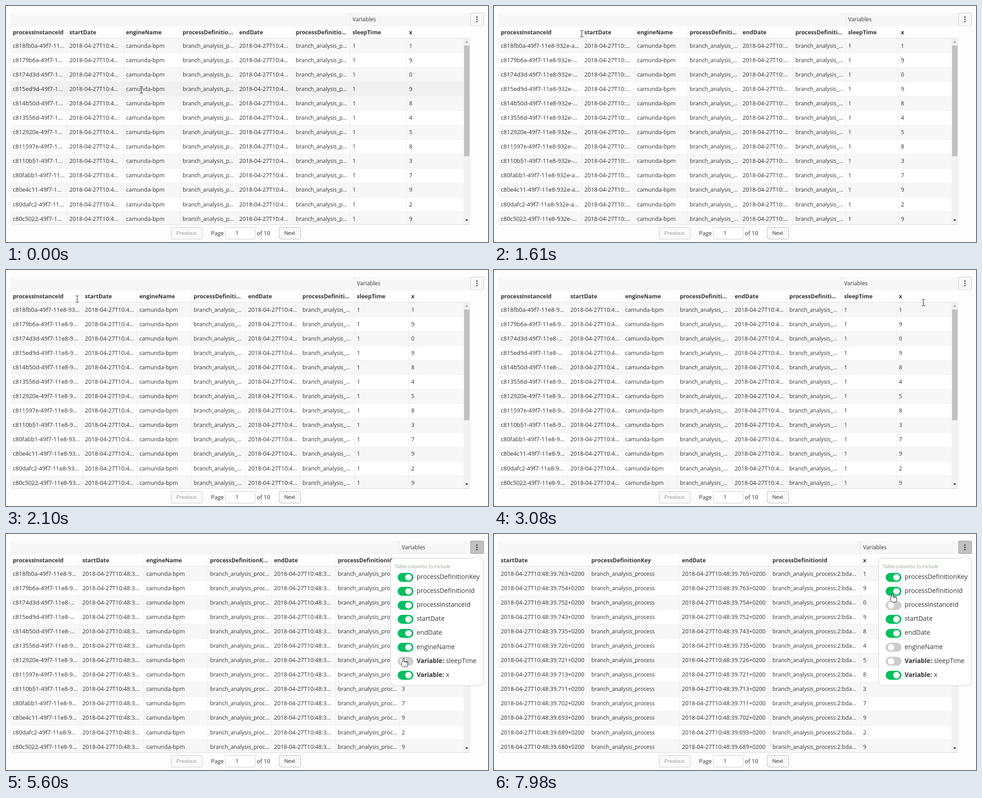
Write an HTML page with a canvas that moves like this. It is 1067x525 px and loops after 8000 ms.

```html
<!DOCTYPE html>
<html lang="en">
<head>
<meta charset="utf-8">
<title>Resizable table with column selection</title>
<style>
  html, body { margin: 0; width: 100%; height: 100%; overflow: hidden; background: #fdfdfd; }
  canvas { display: block; }
</style>
</head>
<body>
<canvas id="stage" width="1067" height="525"></canvas>
<script>
const ctx = document.getElementById('stage').getContext('2d');
const LOOP = 8000, STEP = 70;
const LEFT = 10, TABLE_WIDTH = 1002.5, ROW_TOP = 72, ROW_HEIGHT = 32.08, PADDING = 5;
const FAMILY = '"Open Sans", "Noto Sans", sans-serif';
const font = (size, weight = 400) => `${weight} ${size}px ${FAMILY}`;
const BODY = font(12.25), HEAD = font(12.45, 700), IDS = font(12.85), DIGITS = font(12.7);

// id, milliseconds of the start date, value of x
const rows = `c818fb0a 763 1, c8179b6a 754 9, c8174d3d 752 0, c815ed9d 743 9, c814b50d 735 8,
  c813556d 726 4, c812920e 721 5, c811597e 713 8, c8110b51 711 3, c80fabb1 702 7,
  c80e4c11 693 9, c80dafc2 689 2, c80c5022 680 9`.split(',').map(row => {
  const [id, start, x] = row.trim().split(' ');
  return { id, start, x };
});
// Each instance ends when the one listed above it starts.
rows.forEach((row, i) => row.end = i ? rows[i - 1].start : '765');
const date = millis => `2018-04-27T10:48:39.${millis}+0200`;

const columns = [
  { name: 'processInstanceId', font: IDS, cell: row => row.id + '-49f7-11e8-932e-abd4c0e1' },
  { name: 'startDate', font: DIGITS, cell: row => date(row.start) },
  { name: 'engineName', font: font(12.5), cell: () => 'camunda-bpm' },
  { name: 'processDefinitionKey', font: BODY, cell: () => 'branch_analysis_process' },
  { name: 'endDate', font: DIGITS, cell: row => date(row.end) },
  { name: 'processDefinitionId', font: BODY, cell: () => 'branch_analysis_process:2:bdab40d2' },
  { name: 'sleepTime', font: DIGITS, variable: true, cell: () => '1' },
  { name: 'x', font: DIGITS, variable: true, cell: row => row.x }
];
const menu = ['processDefinitionKey', 'processDefinitionId', 'processInstanceId',
  'startDate', 'endDate', 'engineName', 'sleepTime', 'x'];

// Moments at which switches are clicked; the table follows shortly after.
const clicks = { sleepTime: 5390, engineName: 6790, processInstanceId: 7490 };
const RELAYOUT_DELAY = 140, SWITCH_TIME = 210;
const DRAG_START = 1260, DRAG_END = 2240, FOCUS_AT = 3360, MENU_AT = 3570;

// [time, x, y] of the pointer's hot spot
const pointerPath = [
  [0, 300, 186], [840, 122, 61], [1190, 135.3, 61], [1260, 135.3, 61],
  [1540, 195, 61], [1880, 195, 61], [2100, 158, 64], [2170, 164, 62], [2310, 164, 62],
  [2800, 610, 166], [3150, 1036, 48], [3430, 1040, 20], [3710, 1040, 33],
  [4200, 914, 100], [4550, 867, 262], [4900, 867, 314], [5250, 880, 276], [5740, 880, 276],
  [6300, 890, 247], [6930, 890, 247], [7420, 884, 151], [7630, 884, 151], [7980, 882, 132]
];

function pointerAt(t) {
  const next = pointerPath.findIndex(point => point[0] > t);
  if (next < 0) return pointerPath.at(-1).slice(1);
  const [t0, x0, y0] = pointerPath[next - 1], [t1, x1, y1] = pointerPath[next];
  const k = (t - t0) / (t1 - t0);
  return [x0 + (x1 - x0) * k, y0 + (y1 - y0) * k];
}

function text(value, x, y, face = BODY, color = '#333') {
  ctx.font = face;
  ctx.fillStyle = color;
  ctx.fillText(value, x, y);
}

function fitted(value, x, y, width, face) {
  ctx.font = face;
  let shown = value, length = value.length;
  while (length && ctx.measureText(shown).width > width) shown = value.slice(0, --length) + '...';
  text(shown, x, y, face);
}

function rect(x, y, w, h, color) {
  ctx.fillStyle = color;
  ctx.fillRect(x, y, w, h);
}

function paint(fill, stroke) {
  ctx.fillStyle = fill;
  ctx.fill();
  if (!stroke) return;
  ctx.strokeStyle = stroke;
  ctx.stroke();
}

function box(x, y, w, h, radius, fill, stroke) {
  ctx.beginPath();
  ctx.roundRect(x, y, w, h, radius);
  paint(fill, stroke);
}

function circle(x, y, r, color) {
  ctx.beginPath();
  ctx.arc(x, y, r, 0, 2 * Math.PI);
  paint(color);
}

// Triangle pointing up (or down for a negative height)
function triangle(x, y, halfWidth, height, fill, stroke) {
  ctx.beginPath();
  ctx.moveTo(x - halfWidth, y + height);
  ctx.lineTo(x, y);
  ctx.lineTo(x + halfWidth, y + height);
  paint(fill, stroke);
}

function drawTable(t, [px, py]) {
  const visible = columns.filter(c => !(t >= clicks[c.name] + RELAYOUT_DELAY));
  const resized = t >= DRAG_START && visible[0] === columns[0];
  // The dragged edge trails the pointer by one step.
  const first = resized
    ? pointerAt(Math.min(t, DRAG_END) - STEP)[0] - LEFT
    : TABLE_WIDTH / visible.length;
  const rest = (TABLE_WIDTH - first) / (visible.length - 1);
  const hovered = py > ROW_TOP && px < 1013 && t < MENU_AT ? Math.floor((py - ROW_TOP) / ROW_HEIGHT) : -1;

  rect(LEFT, 15, 1018, 28, '#f7f7f7');
  rect(LEFT, 43, 1018, 443, '#fff');
  rect(LEFT, 43, 1018, 1, '#ececec');
  rows.forEach((_, i) => {
    const top = Math.round(ROW_TOP + i * ROW_HEIGHT), height = Math.min(33, 486 - top);
    rect(LEFT, top, 1003, height, i === hovered ? '#f0f0f0' : i % 2 ? '#fff' : '#f7f7f7');
    rect(LEFT, top, 1003, 1, '#f2f2f2');
  });
  rect(LEFT, 71, 1018, 1, '#e4e4e4');

  const firstVariable = visible.find(c => c.variable);
  visible.forEach((column, n) => {
    const left = n ? LEFT + first + (n - 1) * rest : LEFT;
    const x = left + PADDING, room = (n ? rest : first) - 2 * PADDING;
    if (n) rect(Math.round(left) - 1, 44, 1, 442, '#eee');
    if (column === firstVariable) {
      rect(Math.round(left) - 1, 15, 1, 28, '#e6e6e6');
      text('Variables', x, 34);
    }
    fitted(column.name, x, 63, room, HEAD);
    rows.forEach((row, i) =>
      fitted(column.cell(row), x, Math.round(92.7 + i * ROW_HEIGHT), room, column.font));
  });

  rect(1013, 72, 15, 414, '#f1f1f1');
  rect(1014, 88, 12, 246, '#c1c1c1');
  triangle(1020, 78, 3.5, 4, '#a3a3a3');
  triangle(1020, 479, 3.5, -4, '#404040');
  rect(LEFT, 486, 1018, 1, '#ddd');
}

function drawPager() {
  const buttonFont = '11.6px "Liberation Sans", Arial, sans-serif';
  box(365.5, 492.5, 69, 26, 2, '#f9f9f9', '#ccc');
  text('Previous', 377, 509, buttonFont, '#999');
  text('Page', 454, 510);
  box(485.5, 492.5, 66, 26, 2, '#fff', '#ccc');
  text('1', 508, 510, DIGITS);
  text('of 10', 555, 510, DIGITS);
  box(604.5, 492.5, 48, 26, 2, '#f8f8f8', '#bbb');
  text('Next', 616, 509, buttonFont);
}

function drawMenuButton(t) {
  const pressed = t >= FOCUS_AT;
  ctx.save();
  if (pressed && t < clicks.sleepTime) {
    ctx.shadowColor = '#2f94d6';
    ctx.shadowBlur = 5;
  }
  box(1028.5, 15.5, 29, 28, 1, pressed ? '#c0c0c0' : '#f9f9f9', pressed ? '#999' : '#ccc');
  ctx.restore();
  for (const y of [24.5, 29.5, 34.5]) circle(1042.5, y, 1.6, '#333');
}

function drawMenu(t) {
  box(851.5, 53.5, 206, 284, 9, '#fff', '#ccc');
  triangle(1043, 45, 9, 9, '#fff', '#ccc');
  text('Table columns to include', 861, 76, font(10.7), '#86a58a');

  menu.forEach((name, i) => {
    const y = 96.5 + i * 31.1, baseline = Math.round(100 + i * 31.1);
    const off = Math.min(1, Math.max(0, (t - (clicks[name] ?? LOOP)) / SWITCH_TIME));
    box(867, y - 10, 35, 20, 10, off > 0.3 ? '#ccc' : '#00bf5f');
    circle(891 - 12 * off, y, 7.2, '#fff');
    const isVariable = columns.find(c => c.name === name).variable;
    if (isVariable) text('Variable:', 909, baseline, font(13.8, 700));
    text(name, isVariable ? 974 : 909, baseline, font(14.2));
  });
}

function drawIBeam() {
  rect(-1, -6, 1, 13, '#111');
  for (const y of [-7, 7]) {
    rect(-4, y, 3, 1, '#111');
    rect(0, y, 3, 1, '#111');
  }
}

function drawArrow() {
  ctx.beginPath();
  ctx.lineTo(0, 0);
  ctx.lineTo(0, 16);
  ctx.lineTo(4, 12.5);
  ctx.lineTo(7.5, 18);
  ctx.lineTo(7, 11.5);
  ctx.lineTo(11.5, 11.5);
  ctx.closePath();
  paint('#fff', '#111');
}

function drawHand() {
  box(-1.5, 0.5, 3, 12, 1.5, '#fff', '#111');
  box(-4.5, 7.5, 14, 12, [3, 3, 4, 6], '#fff', '#111');
  rect(-1, 3, 2, 10, '#fff');
  for (const x of [1.5, 4.3, 7]) rect(x, 7, 1, 3.5, '#111');
}

function drawPointer(t, [x, y]) {
  ctx.save();
  ctx.translate(Math.round(x), Math.round(y));
  if (x > 1013) drawArrow();
  else if (t >= MENU_AT && x < 905) drawHand();
  else drawIBeam();
  ctx.restore();
}

function draw(t) {
  const pointer = pointerAt(t);
  rect(0, 0, 1067, 525, '#fdfdfd');
  drawTable(t, pointer);
  drawPager();
  drawMenuButton(t);
  if (t >= MENU_AT) drawMenu(t);
  drawPointer(t, pointer);
}

const start = performance.now();
let last = -1;
function tick() {
  const t = Math.floor((performance.now() - start) % LOOP / STEP) * STEP;
  if (t !== last) draw(last = t);
  requestAnimationFrame(tick);
}
tick();
</script>
</body>
</html>
```
